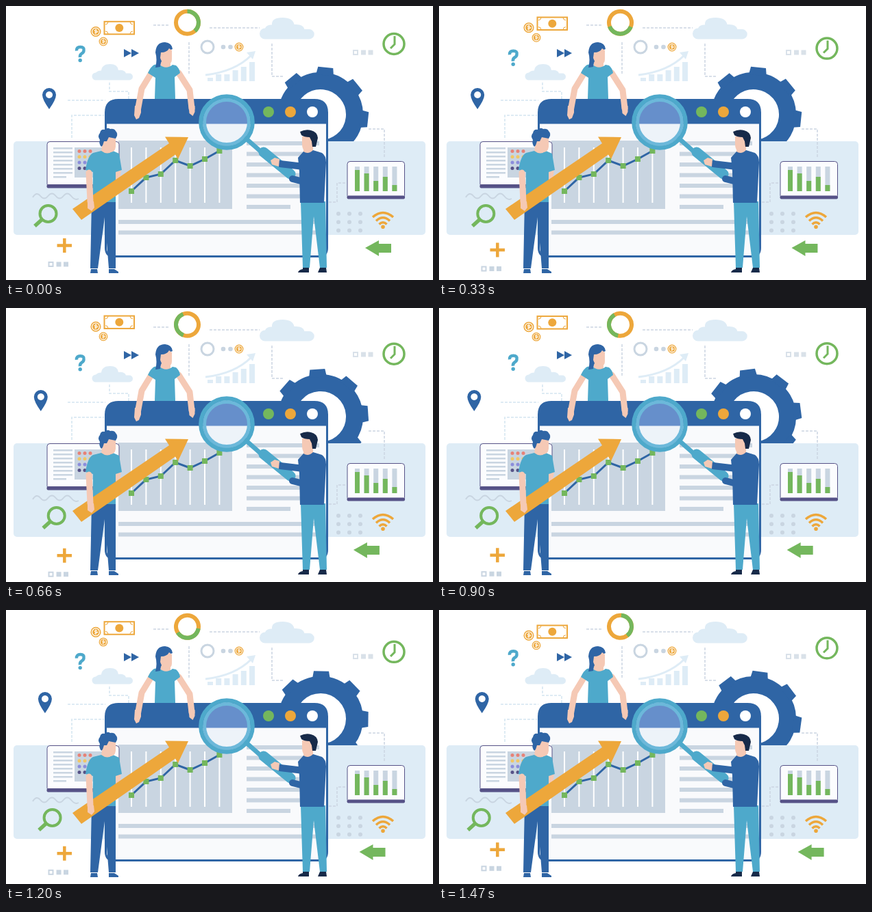
An HTML page that plays this animation: 623 by 401 pixels, repeating every 1.5 s.

```html
<!DOCTYPE html>
<html lang="en">
<head>
<meta charset="utf-8">
<title>Data analysis</title>
<style>
  html, body { margin: 0; width: 100%; height: 100%; overflow: hidden; background: #fff; }
  svg { display: block; width: 623px; height: 401px; }
  .blue { fill: #2f65a5; } .teal { fill: #4ea9cb; } .pale { fill: #deecf6; } .gray { fill: #c9d5e1; }
  .orange { fill: #eda73b; } .green { fill: #74b75d; } .skin { fill: #f5c9b5; } .dark { fill: #172a49; }
  .purple { fill: #565287; } .white { fill: #fff; }
  .line { fill: none; }
  .s-blue { stroke: #2f65a5; } .s-teal { stroke: #4ea9cb; } .s-gray { stroke: #c9d5e1; }
  .s-orange { stroke: #eda73b; } .s-green { stroke: #74b75d; } .s-skin { stroke: #f5c9b5; }
  .round { stroke-linecap: round; stroke-linejoin: round; }
  .dash { fill: none; stroke: #cbd5e2; stroke-width: 1.5; stroke-dasharray: 4 2; }
  .dash.soft { stroke: #d3e5f1; }
</style>
</head>
<body>
<svg viewBox="0 0 623 401">
  <!-- backdrop -->
  <g id="gear" class="blue"></g>
  <rect class="pale" x="11" y="198" width="601" height="137" rx="5"/>
  <path class="pale" d="M378 48.500a8 8 0 0 1 0-16q2-5 10-5q-1-10.500 15.500-10.500q15 0 17 10q13-1 15 7h7a7.200 7.200 0 0 1 0 14.500z"/>
  <path class="pale" d="M131 108.500a5.500 5.500 0 0 1 0-11q3-3 8-3q1-9.500 13-9.500q11 0 12 9q9-1 11 4.500h5a5 5 0 0 1 0 10z"/>
  <path class="dash" d="M215 28h24M297 32h73M267 53v48M388 55v48h18M529 180h23v43M471 287h12v-28h14"/>
  <path class="dash soft" d="M151 112v13h28v11M90 138h55M96 193v-33h47"/>
  <circle class="line s-gray" cx="294" cy="60" r="9" stroke-width="3"/>
  <circle class="gray" cx="317" cy="60" r="3.300"/><circle class="gray" cx="327.500" cy="60" r="3.300"/>
  <g class="coin" transform="translate(340 60) scale(.85)"></g>
  <g id="smallBars" class="pale"></g>
  <path class="line" stroke="#deecf6" stroke-width="3" d="M291 101Q334 96 358 72"/>
  <path class="pale" d="M351 68l13-2-4 12z"/>
  <path class="blue" d="M172 63l11 6-11 6zM183 63l11 6-11 6z"/>
  <g class="boxes" transform="translate(506 64)" opacity=".7"></g>

  <!-- window -->
  <path class="blue" d="M144 156q0-20 20-20h286q20 0 20 20v198q0 14-14 14H158q-14 0-14-14z"/>
  <path fill="#f9fafc" d="M147 172.500h320v181.500q0 11-11 11H158q-11 0-11-11z"/>
  <circle class="green" cx="383" cy="155" r="8"/><circle class="orange" cx="415" cy="155" r="8"/>
  <circle class="white" cx="447" cy="155" r="8"/>
  <rect class="gray" x="164" y="197" width="166" height="100"/>
  <g id="chart"></g>
  <g id="textLines" class="gray"></g>

  <!-- tablets -->
  <rect x="60" y="198.500" width="105" height="66" rx="4" fill="#fbfcfe" stroke="#565287"/>
  <rect class="purple" x="59.500" y="261" width="106" height="5.500" rx="2"/>
  <rect class="gray" x="100" y="207" width="52" height="44"/>
  <g id="leftTablet" class="gray"></g>
  <rect x="498" y="227.500" width="83.500" height="54" rx="4" fill="#fbfcfe" stroke="#565287"/>
  <rect class="purple" x="497.500" y="277.500" width="84.500" height="5" rx="2"/>
  <g id="rightTablet"></g>

  <!-- magnifier -->
  <path class="line s-teal" stroke-width="6.500" d="M348 192l26 23"/>
  <path class="line s-teal round" stroke-width="15" d="M376 214l39 32"/>
  <circle cx="322" cy="170" r="34" fill="#edf3f9"/>
  <path fill="#668fcb" d="M288 172.500a34 34 0 1 1 68 0z"/>
  <circle class="line" cx="322" cy="170" r="32.500" stroke="#6cb8da" stroke-width="5"/>
  <circle class="line s-teal" cx="322" cy="170" r="37.800" stroke-width="6"/>

  <!-- woman -->
  <g>
    <path class="line s-skin round" stroke-width="9" d="M212 98L198 121 192.500 151M252 98L268 123 271 150"/>
    <path class="skin" d="M188 146h9l0 10-3 8-4 2-3-6zM266.500 146h9l0 9-3 6-5-4zM226 78h14v14h-14z"/>
    <path class="teal" d="M223 85q10 9 20 1l5 1q5 4 6 11l-8 6 1 32h-30l1-31-11-7q4-9 9-12z"/>
    <path class="blue" d="M218 90q3-12 0-22q1-15 14-15q10 1 11 10l-10 4-7 16-1 6-6 1z"/>
    <path class="skin" d="M226 68q9 0 12-6l4 3v13q0 7-6 7-9-1-11-9z"/>
  </g>

  <!-- man with arrow -->
  <g>
    <path class="line s-skin round" stroke-width="8" d="M164 238l-3 24"/>
    <path class="blue" d="M125 285h35l0 99h-10l-6-75-10 75h-11z"/>
    <path class="blue" d="M124 385h9l1 6h-11zM150 385h8l6 4v2h-14z"/>
    <path class="skin" d="M140 203h15v13l-8 4-8-5z"/>
    <path class="teal" d="M139 212q9 7 17 0l9 4 4 24-9 3v44h-34l1-44-11-3q3-21 11-25z"/>
    <path class="skin" d="M140 196l6 1 3-6 11 1v14q-1 8-8 8-9-1-12-9z"/>
    <path class="blue" d="M139 206q-4-5-2-10-4-6 0-10 1-6 7-5 4-4 8-1 6-1 8 3 4 4 1 9l-1 2-10-2-3 6-4 0-2 6z"/>
    <path class="orange" d="M97 297l141-96-6-9.500 34 .5-15 32-4-6.500-137 95.500z"/>
    <path class="line s-skin round" stroke-width="9" d="M121 244l2 42"/>
    <path class="skin" d="M119 286h9l1 9-4 5-6-4z"/>
  </g>

  <!-- man with magnifier -->
  <g>
    <path class="teal" d="M430 286h36l2 97h-10l-9-75-6 75h-10z"/>
    <path class="dark" d="M433 383h9v7h-16q1-4 7-5zM458 383h9l1 7h-13z"/>
    <path class="skin" d="M434 202h14v14h-14z"/>
    <path class="line s-blue round" stroke-width="10" d="M434 235l-34-4M434 257l-16-4"/>
    <path class="skin" d="M399 224l-7-2-6 4 2 6 10 3z"/>
    <path class="blue" d="M434 213q7 5 14-2l13 4q6 4 6 14l-3 59h-35l-1-46-2-20z"/>
    <path class="skin" d="M432 191l14-1 4 9-3 10q-4 6-10 4-5-3-5-11z"/>
    <path class="dark" d="M429 184q8-4 16-2 9 2 10 11l-3 13h-5l-1-8-3-6q-8 0-12-3z"/>
  </g>

  <!-- still icons -->
  <path class="line s-gray" stroke-width="2" d="M39 280q5.600-9 11.200-2t11.200 0 11.200 0 11.200 0 11.200 0 11 4"/>
  <g id="dots" class="gray"></g>
  <circle class="orange" cx="550" cy="323.300" r="2.800"/>
  <path class="line s-orange" stroke-width="3.500" d="M544.500 319.500q5.500-5.500 11 0M540 314.500q10-9.500 20 0M535 309q15-13 30 0"/>

  <!-- moving icons -->
  <g id="ring">
    <circle class="line s-orange" cx="264.500" cy="24.300" r="16.500" stroke-width="6"/>
    <path class="line s-green" stroke-width="6" d="M264.500 7.800a16.500 16.500 0 0 1 11 28.800"/>
  </g>
  <g data-move="0 -11.500">
    <rect x="143.500" y="22.800" width="43.500" height="18.500" class="white s-orange" stroke-width="2"/>
    <circle class="orange" cx="165.300" cy="32" r="6"/>
    <path class="line s-orange" d="M145 27q4 0 4-4M185 27q-4 0-4-4M145 37q4 0 4 4M185 37q-4 0-4 4"/>
  </g>
  <g data-move="0 -10.500">
    <g class="coin" transform="translate(131 37.500)"></g>
    <g class="coin" transform="translate(142 52) scale(.85)"></g>
  </g>
  <g data-move="0 10.500">
    <path class="line s-teal" stroke-width="4.500" d="M103 65.500q-.5-5.500 5.500-5.500t5 5q0 3-3 4.500-3 2-2.500 5.500"/>
    <circle class="teal" cx="108.200" cy="79.500" r="2.700"/>
  </g>
  <path data-move="-12.500 0" class="blue" fill-rule="evenodd"
    d="M63 151q-10-14-10-21a10 10 0 0 1 20 0q0 7-10 21zM63 125a5 5 0 1 0 .1 0z"/>
  <g data-move="0 12" class="line s-green">
    <circle cx="566" cy="55.500" r="15" stroke-width="3.500" fill="#fff"/>
    <path stroke-width="3" d="M567 44v12l-6 6"/>
  </g>
  <g data-move="12.500 0" class="line s-green">
    <circle cx="61.500" cy="304" r="12" stroke-width="4"/>
    <path stroke-width="5.500" d="M53 312l-11 10"/>
  </g>
  <path data-move="0 12" class="line s-orange" stroke-width="4.500" d="M74.500 350.500h21.500M85.300 340v21"/>
  <g data-move="0 12"><g class="boxes" transform="translate(61.500 374)"></g></g>
  <path data-move="-17.500 0" class="green" d="M524 354l20-11v5h18v13h-18v5z"/>
</svg>
<script>
const $ = s => document.querySelector(s);
const rect = (x, y, w, h, cls = "") => `<rect class="${cls}" x="${x}" y="${y}" width="${w}" height="${h}"/>`;
const range = n => [...Array(n).keys()];

$("#gear").innerHTML =
  `<circle class="line s-blue" cx="459" cy="159" r="49.500" stroke-width="25"/>` +
  range(8).map(i => `<path d="M446 101l2-11.500h22l2 11.500z" transform="rotate(${i * 45} 459 159)"/>`).join("");

$("#smallBars").innerHTML = [105, 100, 100, 94, 89, 82]
  .map((y, i) => rect(294 + i * 12.2, y, 8, 110 - y)).join("");

const points = [271, 251, 246, 226, 234, 224, 212].map((y, i) => [183 + i * 21.4, y]);
$("#chart").innerHTML =
  points.map(([x]) => rect(x - 1, 207, 2, 81, "white")).join("") +
  `<polyline class="line s-blue" stroke-width="3" points="${points.join(" ")}"/>` +
  points.map(([x, y]) => rect(x - 4, y - 4, 8, 8, "green")).join("");

$("#textLines").innerHTML =
  range(7).map(i => rect(351, 198 + i * 15.5, i == 6 ? 64 : 106, 6)).join("") +
  rect(164, 313, 291, 6) + rect(164, 328.5, 291, 6);

const dotColors = ["#e78277", "#f0c766", "#8b8ddb", "#565287"];
$("#leftTablet").innerHTML =
  range(8).map(i => rect(69, 207 + i * 6, i == 7 ? 19 : 28, 2.5)).join("") +
  range(12).map(i => `<circle cx="${107 + i % 3 * 8}" cy="${212.5 + (i / 3 | 0) * 8.3}" r="2.500" fill="${dotColors[i / 3 | 0]}"/>`).join("");

$("#rightTablet").innerHTML = [240, 245, 256, 250, 262]
  .map((y, i) => rect(509 + i * 13.6, 235, 7, 36, "gray") + rect(509 + i * 13.6, y, 7, 271 - y, "green")).join("");

$("#dots").innerHTML = range(9)
  .map(i => `<circle cx="${485 + i % 3 * 16}" cy="${304 + (i / 3 | 0) * 12.2}" r="3"/>`).join("");

document.querySelectorAll(".coin").forEach(g => g.innerHTML =
  `<circle class="white s-orange" r="6.800" stroke-width="1.500"/><circle class="orange" r="4.800"/>
   <path class="line" stroke="#fff" d="M2-2q-4-1.500-4 .5t4 1.500-4 2M0-4v8"/>`);

document.querySelectorAll(".boxes").forEach(g => g.innerHTML =
  `<rect class="line s-gray" x="1" y="1" width="6" height="6" stroke-width="2"/>` +
  rect(12, .5, 7, 7, "gray") + rect(22.5, .5, 7, 7, "gray"));

const LOOP = 1500;
const movers = [...document.querySelectorAll("[data-move]")]
  .map(el => [el, ...el.dataset.move.split(" ").map(Number)]);

function draw(now) {
  // swing out and back once per loop
  const k = Math.sin(Math.PI * (now % LOOP) / LOOP) ** 1.35;
  for (const [el, dx, dy] of movers) el.setAttribute("transform", `translate(${dx * k} ${dy * k})`);
  $("#gear").setAttribute("transform", `rotate(${6 + 82 * k} 459 159)`);
  $("#ring").setAttribute("transform", `rotate(${205 * k} 264.500 24.300)`);
  requestAnimationFrame(() => draw(performance.now()));
}
draw(0);
</script>
</body>
</html>
```
